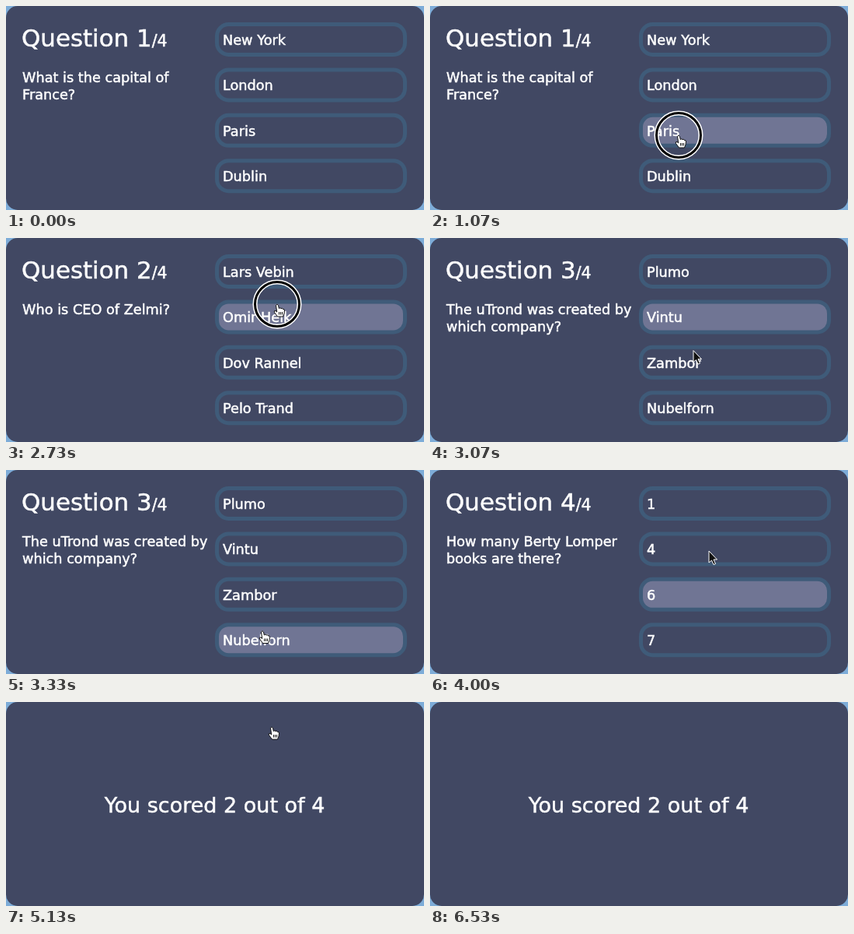
Recreate the animation shown at these times as an HTML page. Size 538 by 262 pixels, loop 7270 ms.

```html
<!DOCTYPE html>
<html lang="en">
<head>
<meta charset="utf-8">
<title>Quiz</title>
<style>
  html, body { margin: 0; height: 100%; overflow: hidden; background: #7dacd8; }
  svg { display: block; width: 538px; height: 262px; }
  text {
    font: 17.7px "DejaVu Sans", Verdana, sans-serif;
    fill: #fff; stroke: #fff; stroke-width: .5px;
  }
  .title { font-size: 30.9px; }
  .total { font-size: 20.4px; }
  .score { font-size: 27px; text-anchor: middle; }
  .panel { fill: #414863; }
  .answer { fill: none; stroke: #3f5b79; stroke-width: 5px; }
  .answer.hover { fill: #707594; }
  .ring { fill: none; stroke: #fff; stroke-width: 6px; }
  .ring.dark { stroke: #000; stroke-width: 3px; }
  .hand { fill: #fff; stroke: #111; }
  .arrow { fill: #111; stroke: #fff; }
</style>
</head>
<body>
<svg id="stage" viewBox="0 0 538 262"></svg>
<script>
const LOOP = 7270, TICKS = 109;

const quiz = [
  [["What is the capital of", "France?"], ["New York", "London", "Paris", "Dublin"]],
  [["Who is CEO of Zelmi?"], ["Lars Vebin", "Omir Helk", "Dov Rannel", "Pelo Trand"]],
  [["The uTrond was created by", "which company?"], ["Plumo", "Vintu", "Zambor", "Nubelforn"]],
  [["How many Berty Lomper", "books are there?"], ["1", "4", "6", "7"]]
];

// Times below are in ticks of LOOP / TICKS ms.
const clicks = [16, 41, 53, 75], PRESS = 2;
const ENTER = 5, LEAVE = 95, GONE = 98;

const smooth = p => p * p * (3 - 2 * p);
const easeIn = p => p * p;
const easeOut = p => p * (2 - p);
const linear = p => p;

// Pointer path: tick, x, y, easing towards this point
const path = [
  [ENTER, 302, 240], [13, 320, 166, easeOut], [18, 320, 166],
  [26, 311, 160, smooth], [27, 311, 160], [37, 349, 85, smooth],
  [43, 349, 85], [49, 329, 204, smooth], [51, 331, 209, linear],
  [56, 331, 209], [60, 359, 104, easeIn], [63, 342, 32, easeOut],
  [LEAVE, 342, 32], [97, 309, 178, linear]
];

function pointerAt(tick) {
  const next = path.findIndex(key => key[0] > tick);
  if (next < 0) return path[path.length - 1].slice(1, 3);
  if (next === 0) return path[0].slice(1, 3);
  const [t0, x0, y0] = path[next - 1];
  const [t1, x1, y1, ease = linear] = path[next];
  const p = ease((tick - t0) / (t1 - t0));
  return [x0 + (x1 - x0) * p, y0 + (y1 - y0) * p];
}

const rowTop = i => 21 + 58.4 * i;

function rowAt(tick) {
  const y = pointerAt(tick)[1];
  return [0, 1, 2, 3].find(i => y >= rowTop(i) && y <= rowTop(i) + 44);
}

const label = (x, y, s, cls = "") => `<text class="${cls}" x="${x}" y="${y}">${s}</text>`;

function question(n, hovered) {
  const [lines, answers] = quiz[n];
  return label(20, 52, `Question ${n + 1}<tspan class="total">/4</tspan>`, "title") +
    lines.map((s, i) => label(21, 97.5 + 22 * i, s)).join("") +
    answers.map((s, i) =>
      `<rect class="answer ${i === hovered ? "hover" : ""}" x="271.5" y="${rowTop(i) + 2.5}"
        width="242" height="39" rx="15"/>` + label(279, rowTop(i) + 29, s)).join("");
}

function pointer(tick, hand, pressed) {
  const [x, y] = pointerAt(tick);
  const shape = hand
    ? `<path class="hand" d="M-1.5 1.5Q0-1 1.5 1.5L2.3 5.5Q4 4 5 5.5Q7 4.5 7.5 6.5Q9.5 6 9.5 8
        L9 12 7.5 16H.5L-3.5 10.5Q-4.5 8-2 8.5L-.3 10ZM2.5 10v3.5M4.5 10v3.5M6.5 10v3.5"/>`
    : `<path class="arrow" d="M0 0V15L3.5 12 6 17.5 8.5 16.5 6 11H10.5Z"/>`;
  const ring = pressed ? `<circle class="ring" r="28.5"/><circle class="ring dark" r="28.5"/>` : "";
  return `<g transform="translate(${x} ${y})">${shape}${ring}</g>`;
}

function scene(tick) {
  const n = clicks.filter(c => tick >= c + PRESS).length;
  const done = n === quiz.length;
  const visible = tick >= ENTER && tick < GONE;
  const pressed = clicks.some(c => tick >= c && tick < c + PRESS);
  // Hover and cursor shape trail slightly behind the pointer.
  const hovered = visible ? rowAt(tick - 1.35) : undefined;
  const hand = done ? tick <= LEAVE : rowAt(tick - 0.6) !== undefined;
  return `<rect class="panel" width="538" height="262" rx="15"/>` +
    (done ? label(268.5, 141.5, "You scored 2 out of 4", "score") : question(n, hovered)) +
    (visible ? pointer(tick, hand, pressed) : "");
}

const stage = document.getElementById("stage");
const start = performance.now();
let shown = -1;

function frame() {
  const t = (performance.now() - start) % LOOP;
  const tick = Math.floor((t + 10) * TICKS / LOOP) % TICKS;
  if (tick !== shown) stage.innerHTML = scene(shown = tick);
  requestAnimationFrame(frame);
}
frame();
</script>
</body>
</html>
```
